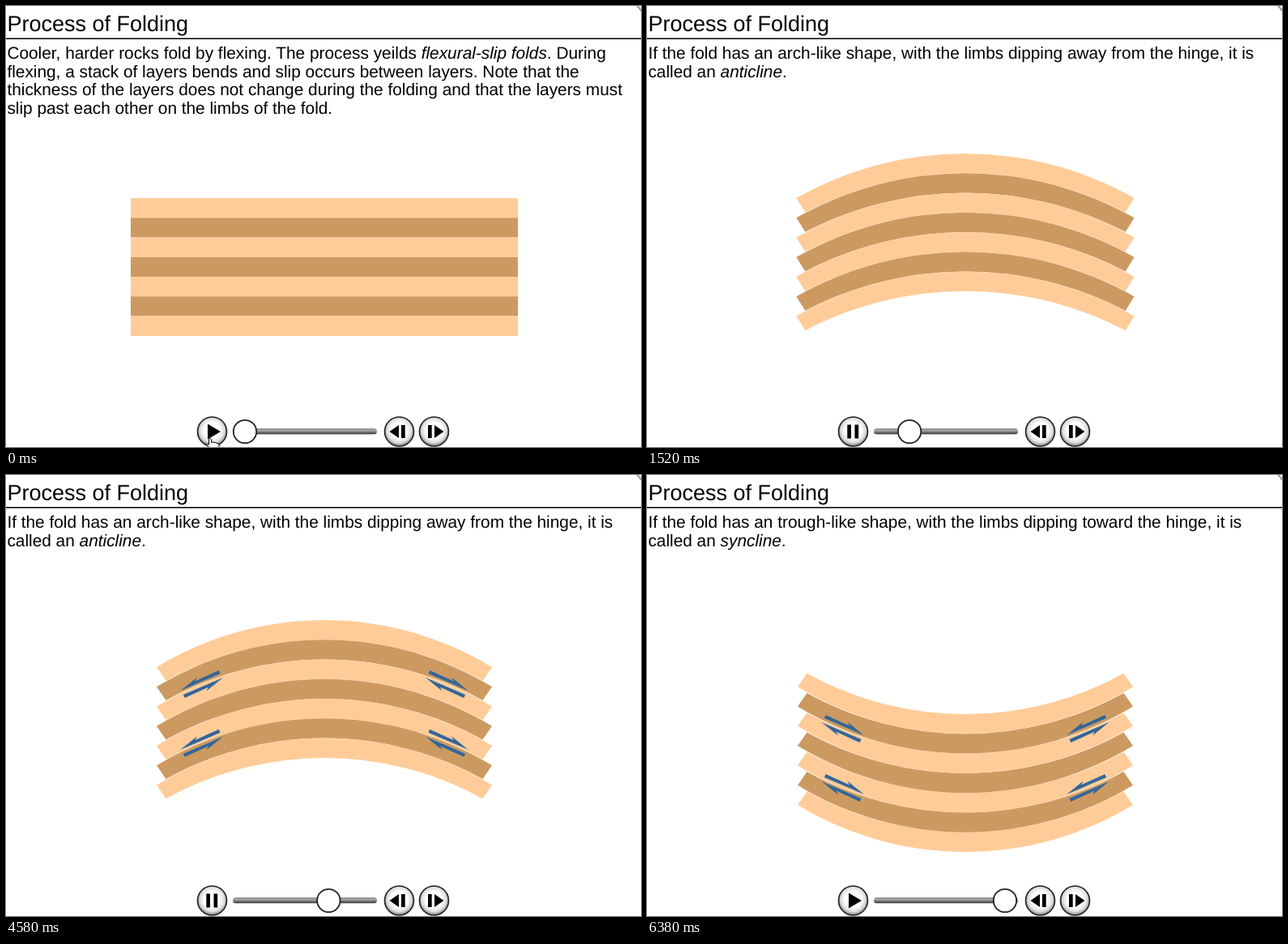
Write an HTML page that moves like this. It is 784x544 px and loops after 7640 ms.

```html
<!DOCTYPE html>
<html lang="en">
<head>
<meta charset="utf-8">
<title>Process of Folding</title>
<style>
  html, body { margin: 0; width: 100%; height: 100%; overflow: hidden; background: #fff; }
  svg { display: block; width: 784px; height: 544px; }
  text { font-family: "Liberation Sans", Arial, sans-serif; text-rendering: geometricPrecision; white-space: pre; }
  .em { font-style: italic; }
</style>
</head>
<body>
<svg viewBox="0 0 784 544">
  <defs>
    <radialGradient id="up" cx=".5" cy=".46" r=".54">
      <stop offset=".5" stop-color="#fff"/>
      <stop offset=".78" stop-color="#ddd"/>
      <stop offset="1" stop-color="#777"/>
    </radialGradient>
    <radialGradient id="down" cx=".5" cy=".5" r=".54">
      <stop offset=".4" stop-color="#ddd"/>
      <stop offset="1" stop-color="#666"/>
    </radialGradient>
    <linearGradient id="rail" x2="0" y2="1">
      <stop offset="0" stop-color="#777"/>
      <stop offset=".35" stop-color="#aaa"/>
      <stop offset="1" stop-color="#333"/>
    </linearGradient>
    <path id="half" d="M215.5 266 236 249.5 233.5 254.3 262.7 241 264.5 245Z"/>
    <g id="pair">
      <use href="#half"/>
      <use href="#half" transform="rotate(180 241.7 258)"/>
    </g>
    <g id="side">
      <use href="#pair"/>
      <use href="#pair" y="72.8"/>
    </g>
    <circle id="disc" cy="525" r="18" stroke="#222" stroke-width="1.6"/>
  </defs>

  <path d="M779 0Q782 2 784 6" fill="none" stroke="#999" stroke-width="2"/>
  <text x="1.4" y="31" font-size="27">Process of Folding</text>
  <path d="M0 40.3H784" stroke="#000" stroke-width="1.4"/>
  <g id="note" font-size="20.83"></g>

  <g id="fold">
    <g id="layers"></g>
    <g id="arrows" fill="#369">
      <use href="#side"/>
      <use href="#side" transform="translate(786) scale(-1 1)"/>
    </g>
  </g>

  <rect x="280" y="521.2" width="178" height="7" rx="3.5" fill="url(#rail)"/>
  <circle id="knob" cy="525" r="14.2" fill="#fff" stroke="#222" stroke-width="1.8"/>
  <use id="button" href="#disc" x="254.5"/>
  <use href="#disc" x="485.5" fill="url(#up)"/>
  <use href="#disc" x="528.5" fill="url(#up)"/>
  <path id="icon"/>
  <path d="M473.5 525 485 517V533ZM488 517h4.7v16h-4.7ZM521 517h4.7v16h-4.7ZM540.5 525 529 517V533Z"/>
  <path id="hand" d="M250.5 541V534.5Q252 532 253.5 534.5V538.5Q255 537 256.7 538.7 258.5 537.6 259.8 539.2 262 538.6 263 541V546H251.5L247.5 540.5Q248.5 538.5 250.5 541Z"
        fill="#fff" stroke="#000"/>
</svg>
<script>
const LOOP = 7640, TICK = 60, LAST = 103, FOLD_TICKS = 20;
const ANTICLINE = 3, SYNCLINE = 83;
const MID = 393, TOP = 237, THICK = 24.27, COUNT = 7;
const PLAY = 'M249 515.5 265 525 249 534.5Z';
const PAUSE = 'M247.3 516.5h4.7v17h-4.7ZM256.5 516.5h4.7v17h-4.7Z';

// Words between asterisks are italic.
const NOTES = [
  ['Cooler, harder rocks fold by flexing. The process yeilds *flexural-slip folds*. During',
   'flexing, a stack of layers bends and slip occurs between layers. Note that the',
   'thickness of the layers does not change during the folding and that the layers must',
   'slip past each other on the limbs of the fold.'],
  ['If the fold has an arch-like shape, with the limbs dipping away from the hinge, it is',
   'called an *anticline*.'],
  ['If the fold has an trough-like shape, with the limbs dipping toward the hinge, it is',
   'called an *syncline*.']
];

const el = id => document.getElementById(id);
const set = (id, name, value) => el(id).setAttribute(name, value);
const show = (id, on) => set(id, 'visibility', on ? 'visible' : 'hidden');

const noteMarkup = lines => lines.map((line, i) =>
  `<text x="1.4" y="${65 + 22.7 * i}">` +
  line.replace(/\*(.+?)\*/g, '<tspan class="em">$1</tspan>') + '</text>').join('');

// Arc through the ends of a chord, with the given rise at the centre.
function arc(half, rise, toX, toY, sweep) {
  if (rise < 0.01) return `L${toX} ${toY}`;
  const r = (half * half + rise * rise) / (2 * rise);
  return `A${r} ${r} 0 0 ${sweep} ${toX} ${toY}`;
}

function layerMarkup(i, bend) {
  const y = TOP + THICK * i;
  const outer = 239 - 32 * bend, inner = outer - 11.5 * bend;
  const drop = THICK - 7.6 * bend ** 2.5;
  const rise = 58 * bend, innerRise = rise + drop - THICK;
  const d = `M${MID - outer} ${y}` + arc(outer, rise, MID + outer, y, 1) +
    `L${MID + inner} ${y + drop}` + arc(inner, innerRise, MID - inner, y + drop, 0) + 'Z';
  return `<path d="${d}" fill="${i % 2 ? '#cc9a61' : '#ffcc99'}"/>`;
}

let shownNote = -1;

function draw(now) {
  const t = now % LOOP;
  const tick = Math.max(0, Math.min(LAST, Math.floor((t - 200) / TICK)));
  const note = tick < ANTICLINE ? 0 : tick < SYNCLINE ? 1 : 2;
  const start = note === 2 ? SYNCLINE : ANTICLINE;
  const bend = Math.max(0, Math.min(1, (tick - start) / FOLD_TICKS));

  if (note !== shownNote) {
    el('note').innerHTML = noteMarkup(NOTES[note]);
    shownNote = note;
  }
  el('layers').innerHTML = Array.from({ length: COUNT }, (_, i) => layerMarkup(i, bend)).join('');
  set('fold', 'transform', note === 2 ? 'translate(0 643.9) scale(1 -1)' : '');
  show('arrows', bend === 1);

  set('knob', 'cx', 295 + 1.4554 * Math.max(0, tick - 2));
  set('button', 'fill', t >= 60 && t < 260 ? 'url(#down)' : 'url(#up)');
  set('icon', 'd', tick > 0 && tick < LAST ? PAUSE : PLAY);
  show('hand', tick < 2);
  requestAnimationFrame(draw);
}
draw(performance.now());
</script>
</body>
</html>
```
